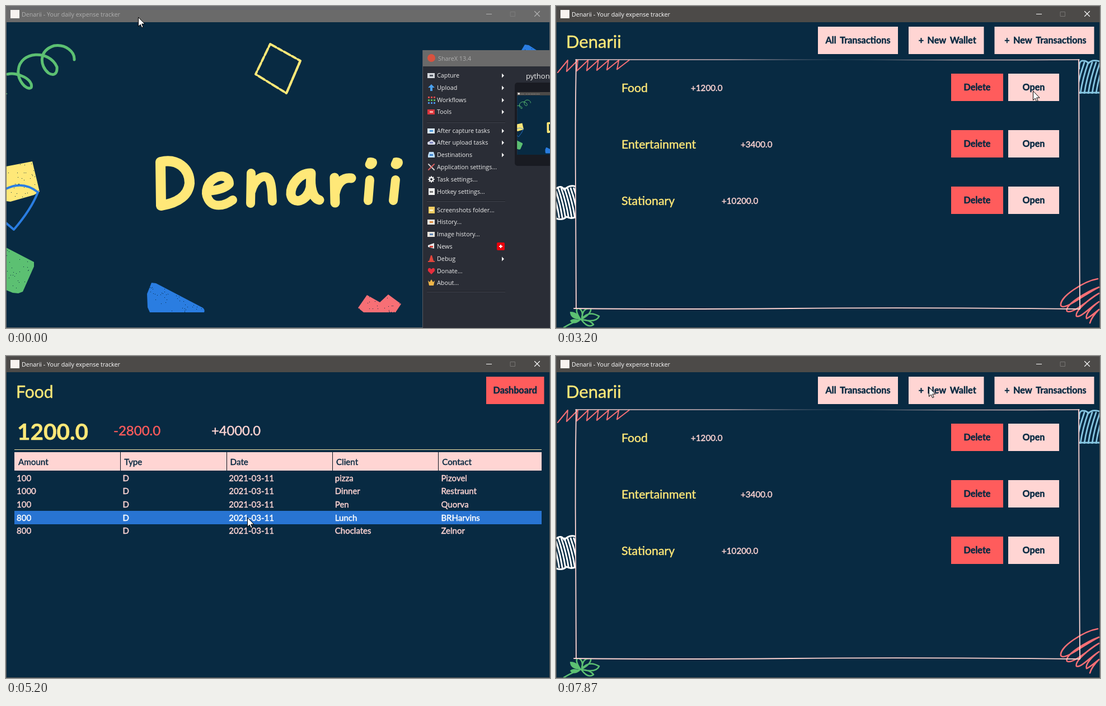
These frames come from a looping animation (972 px wide and 576 px high, 8 s). An HTML page with a canvas:

```html
<!DOCTYPE html>
<html lang="en">
<head>
<meta charset="utf-8">
<title>Denarii</title>
<style>
html, body { margin: 0; width: 100%; height: 100%; overflow: hidden; background: #082a42; }
canvas { display: block; }
</style>
</head>
<body>
<canvas id="stage" width="972" height="576"></canvas>
<script>
const ctx = document.getElementById('stage').getContext('2d');
const LOOP = 8000, FPS = 15;
const NAVY = '#082a42', YELLOW = '#ffe878', PINK = '#ffd5d3', RED = '#ff5c5c';
const BLUE = '#2a7de1', GREEN = '#5cc072', CORAL = '#f76f75', SKY = '#86c5e0';
const HAND = 'Lato, sans-serif', UI = '"Open Sans", sans-serif';

function rect(x, y, w, h, color) {
  ctx.fillStyle = color;
  ctx.fillRect(x, y, w, h);
}
function text(str, x, y, font, color, align = 'left') {
  ctx.font = font;
  ctx.fillStyle = color;
  ctx.textAlign = align;
  ctx.fillText(str, x, y);
}
// Slightly heavier, rounder text for the app's own pages.
function handText(str, x, y, size, color, align = 'left', weight = 400) {
  text(str, x, y, `${weight} ${size}px ${HAND}`, color, align);
  ctx.strokeStyle = color;
  ctx.lineWidth = .45;
  ctx.lineJoin = 'round';
  ctx.strokeText(str, x, y);
}
function fill(d, color) {
  ctx.fillStyle = color;
  ctx.fill(new Path2D(d));
}
function stroke(d, color, width, dash = []) {
  ctx.strokeStyle = color;
  ctx.lineWidth = width;
  ctx.lineCap = ctx.lineJoin = 'round';
  ctx.setLineDash(dash);
  ctx.stroke(new Path2D(d));
  ctx.setLineDash([]);
}
function clipped(x, y, w, h, draw) {
  ctx.save();
  ctx.beginPath();
  ctx.rect(x, y, w, h);
  ctx.clip();
  draw();
  ctx.restore();
}
function random(seed) {
  let s = seed * 7919 + 104729;
  return () => (s = (s * 16807) % 2147483647) / 2147483647;
}

// Filled shape with small chalk gaps inside the box x, y, w, h.
function chalk(d, color, x, y, w, h, count) {
  fill(d, color);
  const rnd = random(x * 31 + y + 7);
  ctx.save();
  ctx.clip(new Path2D(d));
  for (let i = 0; i < count; i++) {
    rect(Math.floor(x + rnd() * w), Math.floor(y + rnd() * h), 1, 1, NAVY);
  }
  ctx.restore();
}

// ---- title bar -----------------------------------------------------------
function windowButtons(color, dim) {
  rect(858, 14, 10, 1, color);
  ctx.strokeStyle = dim;
  ctx.lineWidth = 1;
  ctx.strokeRect(901.5, 10.5, 8, 8);
  stroke('M944.5 9.5L953.5 18.5M953.5 9.5L944.5 18.5', color, 1.1);
}
function windowFrame(active) {
  const edge = active ? '#5b5a59' : '#6d6d6d';
  rect(0, 0, 972, 29, active ? '#4c4a48' : '#6a6a6a');
  rect(0, 0, 972, 1, edge);
  rect(0, 0, 1, 576, edge);
  rect(971, 0, 1, 576, edge);
  rect(0, 575, 972, 1, edge);
  rect(8, 7, 16, 15, '#f7f3f0');
  text('Denarii - Your daily expense tracker', 28, 19, '10.7px ' + UI, active ? '#fff' : '#b0b0b0');
  windowButtons(active ? '#fff' : '#b4b4b4', active ? '#777573' : '#7c7c7c');
}

// ---- splash --------------------------------------------------------------
const LETTERS = [
  ['M276 279C306 272 328 290 328 317C326 337 310 352 277 357Z', 18],
  ['M361 331Q389 329 399 318C399 304 384 302 375 307C360 315 354 332 361 345C369 361 389 359 405 347', 16],
  ['M438 299L437 353M438 332C446 304 467 298 472 314C476 326 475 340 476 349', 16],
  ['M545 299C525 298 508 320 509 337C512 356 538 351 544 325L545 300C543 325 548 344 560 347', 17],
  ['M587 307L588 352M588 335C592 316 602 306 617 308', 17],
  ['M650 311L647 348M696 311L692 348', 16]
];
const DOT = 'M646 272Q654 269 661 274Q665 280 661 286Q655 294 647 291Q640 287 642 281Z';

function splash() {
  rect(0, 29, 972, 547, NAVY);
  stroke('M3 122C20 117 50 132 45 146C36 152 20 132 22 115C25 80 78 78 91 109C92 123 84 125 76 120C60 107 58 80 86 71C107 68 123 82 122 96', GREEN, 5);
  stroke('M472 68L526 98L501 156L446 122Z', YELLOW, 4, [12, 4.5, 7, 5]);
  stroke('M472 68L526 98L501 156L446 122Z', YELLOW, 3);
  stroke('M525 100L502 154', YELLOW, 4);

  chalk('M0 287L47 278L60 332L50 338L8 350L0 349Z', YELLOW, 0, 278, 60, 72, 35);
  stroke('M0 327Q30 312 57 333Q45 364 14 400L0 388', BLUE, 4);
  chalk('M0 432L50 458L50 466L30 511L22 514L12 513L0 508Z', GREEN, 0, 432, 51, 82, 30);
  chalk('M260 495L268 496L352 540Q356 544 354 548H257L253 539L252 515Z', BLUE, 252, 495, 102, 53, 60);
  chalk('M629 540L645 517L668 530L683 516L706 533L696 548H639Z', CORAL, 629, 516, 77, 32, 30);
  chalk('M927 69L934 70L971 94V104L944 157L934 156L915 145L928 110L909 99Z', BLUE, 909, 69, 62, 88, 45);
  chalk('M922 341L964 304L971 315V379L966 384Z', CORAL, 922, 304, 49, 80, 30);
  stroke('M973 288C955 262 942 258 939 269C938 301 953 338 973 341', YELLOW, 4);
  stroke('M909 441C929 445 950 438 959 423Q965 419 973 422M973 433Q954 442 951 433Q955 424 973 428', GREEN, 3);
  rect(0, 156, 2, 2, GREEN);

  for (const [d, width] of LETTERS) stroke(d, YELLOW, width);
  fill(DOT, YELLOW);
  ctx.save();
  ctx.translate(46, 0);
  fill(DOT, YELLOW);
  ctx.restore();
}

// ---- capture tool window -------------------------------------------------
// label, text centre y, trailing arrow, icon colour, icon accent
const MENU = [
  ['Capture', 124, 1, '#d4d7dc', '#555b66'],
  ['Upload', 146, 1, '#4aa0ee', 0],
  ['Workflows', 168, 1, '#4a90e2', 0],
  ['Tools', 189, 1, '#d9363e', '#ffb0a8'],
  ['After capture tasks', 223, 1, '#d8e6f0', '#4d9be0'],
  ['After upload tasks', 244, 1, '#d9dcea', '#7f86c0'],
  ['Destinations', 266, 1, '#bcdcf5', '#3b82cf'],
  ['Application settings...', 288, 0, '#d5d5d5', 0],
  ['Task settings...', 310, 0, '#eeeeee', 0],
  ['Hotkey settings...', 332, 0, '#f0f0f0', '#777'],
  ['Screenshots folder...', 365, 0, '#f2cc62', '#fff3c6'],
  ['History...', 386, 0, '#e8e4dc', '#e08b3c'],
  ['Image history...', 408, 0, '#e8e4dc', '#5d83b5'],
  ['News', 430, 0, '#e8e8e8', '#d9453d'],
  ['Debug', 452, 1, '#e0463c', 0],
  ['Donate...', 474, 0, '#e62d3c', 0],
  ['About...', 495, 0, '#f0b648', 0]
];
const ICONS = {
  Upload: 'M0-6L6 0H2V6H-2V0H-6Z',
  'After upload tasks': 'M-6 4Q-9-1-3-2Q0-7 4-2Q9 0 6 4Z',
  Destinations: 'M-4-5H4L6 1V5H-6V1Z',
  News: 'M-6-2L5-6V4L-6 1Z',
  Debug: 'M-1-6H1L4 4H6V6H-6V4H-4Z',
  'Donate...': 'M0 6L-6 0Q-7-6-2-5L0-3L2-5Q7-6 6 0Z',
  'About...': 'M-6-4L-3-1L0-6L3-1L6-4L4 5H-4Z'
};
function menuIcon(label, y, color, accent) {
  ctx.save();
  ctx.translate(760, y);
  if (label === 'Workflows') {
    ['#e14b4b', '#59b75c', '#4a90e2'].forEach((c, row) => {
      for (let i = 0; i < 3; i++) rect(-6 + i * 5, -6 + row * 5, 3, 3, c);
    });
  } else if (label.startsWith('Application')) {
    stroke('M-5-5L5 5', color, 2);
    stroke('M5-5L-5 5', '#d96060', 2);
  } else if (label.startsWith('Task')) {
    ctx.beginPath();
    ctx.arc(0, 0, 3.2, 0, 7);
    ctx.strokeStyle = color;
    ctx.lineWidth = 2.4;
    ctx.stroke();
    stroke('M0-5V-4M0 4V5M-5 0H-4M4 0H5M-3.5-3.5L-3-3M3.5 3.5L3 3M3.5-3.5L3-3M-3.5 3.5L-3 3', color, 2);
  } else if (ICONS[label]) {
    fill(ICONS[label], color);
  } else if (label.startsWith('Hotkey') || label.startsWith('Screenshots')) {
    rect(-5, -6, 11, 12, color);
  } else {
    rect(-7, -4, 13, 9, color);
  }
  if (accent) rect(-3, -1, 6, 3, accent);
  ctx.restore();
}
function captureWindow() {
  rect(744, 79, 228, 497, '#2a2d36');
  rect(744, 79, 228, 29, '#6a6a6a');
  rect(744, 79, 1, 497, '#555861');
  ctx.beginPath();
  ctx.arc(760, 93, 7, 0, 7);
  ctx.fillStyle = '#d8523f';
  ctx.fill();
  text('ShareX 13.4', 772, 97.5, '10.8px ' + UI, '#adadad');

  for (const [label, y, arrow, color, accent] of MENU) {
    menuIcon(label, y, color, accent);
    text(label, 770, y + 4, '10.8px ' + UI, '#ededed');
    if (arrow) fill(`M886 ${y - 3.5}L890 ${y + .5}L886 ${y + 4.5}Z`, '#f0f0f0');
  }
  for (const y of [207, 348, 510]) {
    rect(752, y, 140, 1, '#1d1f25');
    rect(752, y + 1, 140, 1, '#41444e');
  }
  ctx.beginPath();
  ctx.roundRect(877, 423, 14, 14, 2);
  ctx.fillStyle = '#e8000c';
  ctx.fill();
  rect(881, 429, 6, 2, '#fff');
  rect(883, 427, 2, 6, '#fff');

  text('python_', 929, 130, '13px ' + UI, '#f0f0f0');
  ctx.beginPath();
  ctx.roundRect(909, 137, 70, 149, 5);
  ctx.fillStyle = '#191b22';
  ctx.fill();
  clipped(913, 154, 59, 112, () => {
    ctx.translate(913, 154);
    ctx.scale(.2, .2);
    splash();
    windowFrame(true);
  });
}

// ---- wallet list ---------------------------------------------------------
function button(label, x, y, w, color, pressed) {
  const shift = pressed ? 1 : 0;
  rect(x, y, w, 49, pressed ? '#f0f0f0' : color);
  ctx.wordSpacing = '2.5px';
  handText(label, x + w / 2 + shift, y + 30 + shift, 16.2, pressed ? '#000' : NAVY, 'center', 700);
  ctx.wordSpacing = '0px';
}
function stripes(x0, x1, gap, top, bottom, lean, color, width) {
  for (let x = x0; x < x1; x += gap) {
    stroke(`M${x} ${bottom}Q${x + lean * .3} ${(top + bottom) / 2} ${x + lean} ${top}`, color, width);
  }
}
function doodles() {
  clipped(0, 96, 140, 30, () => {
    let d = 'M3 119L21 97';
    for (let i = 0; i < 6; i++) d += `Q${20 + i * 18} 108 ${19 + i * 18} ${117 - i * .7}L${39 + i * 18.3} 97`;
    stroke(d, CORAL, 2);
  });
  clipped(934, 96, 37, 61, () => {
    stripes(930, 975, 7, 101, 156, 14, SKY, 2.8);
    stroke('M935 112Q934 97 942 98Q949 98 951 103Q957 95 971 99M935 155H972', SKY, 2.8);
  });
  clipped(1, 320, 34, 63, () => {
    stripes(0, 52, 5.6, 326, 378, -13, '#fff', 2.9);
    stroke('M0 327Q9 319 15 329Q23 319 36 323M0 380Q11 384 19 377Q27 382 36 377', '#fff', 3);
  });
  clipped(0, 541, 90, 34, () => {
    fill('M43 561Q25 560 25 547Q39 546 43 561M43 563Q31 572 25 563Q31 557 43 563', GREEN);
    stroke('M14 575Q31 565 46 560M44 561Q32 543 40 540Q50 545 46 560Q47 539 62 541Q64 550 46 560Q58 544 77 555Q72 567 46 561Q62 562 67 570Q57 577 46 562', GREEN, 2.6);
  });
  stroke('M968 488C944 492 899 520 902 536C908 546 947 514 970 503C948 511 908 535 913 546C923 552 952 525 970 514C954 523 926 546 930 555C938 558 955 538 970 529C958 538 945 551 948 559Q952 558 970 543Q957 556 954 567', CORAL, 2.6);
}
function wallets(openPressed) {
  rect(0, 29, 972, 547, NAVY);
  doodles();
  stroke('M36 96Q34 210 35 330L36 541M934 96Q935 230 935 360L936 542M32 541Q200 543 420 541T936 542', PINK, 1.8);
  const fade = ctx.createLinearGradient(35, 0, 935, 0);
  fade.addColorStop(0, PINK);
  fade.addColorStop(.3, '#bfa9b0');
  fade.addColorStop(.52, '#24405680');
  fade.addColorStop(.75, '#a8989f');
  fade.addColorStop(1, PINK);
  stroke('M35 96Q300 95 520 96T935 96', fade, 1.3);

  handText('Denarii', 18, 75, 31, YELLOW);
  button('All Transactions', 468, 37, 143, PINK);
  button(' + New Wallet', 630, 37, 134.5, PINK);
  button(' + New Transactions', 783.5, 37, 178, PINK);
  [['Food', '+1200.0', 241], ['Entertainment', '+3400.0', 330], ['Stationary', '+10200.0', 296]]
    .forEach(([name, sum, x], i) => {
      const y = 121 + i * 101;
      handText(name, 117, y + 32.5, 21.2, YELLOW);
      handText(sum, x, y + 30.5, 15.2, PINK);
      button('Delete', 706, y, 93, RED);
      button('Open', 808, y, 91, PINK, openPressed && i === 0);
    });
}

// ---- wallet page ---------------------------------------------------------
const HEADERS = ['Amount', 'Type', 'Date', 'Client', 'Contact'];
const ROWS = [
  ['100', 'pizza', 'Pizovel'],
  ['1000', 'Dinner', 'Restraunt'],
  ['100', 'Pen', 'Quorva'],
  ['800', 'Lunch', 'BRHarvins'],
  ['800', 'Choclates', 'Zelnor']
];
function walletPage(selected, pressed) {
  rect(0, 29, 972, 547, NAVY);
  handText('Food', 18, 75, 30, YELLOW);
  button('Dashboard', 858, 37, 103.5, RED, pressed);
  handText('1200.0', 20, 150, 40.5, YELLOW, 'left', 700);
  handText('-2800.0', 192, 142, 24, RED);
  handText('+4000.0', 367, 142, 23.7, PINK);
  rect(15, 167, 942, 1, '#f4e6a8');
  rect(15, 172, 942, 33, PINK);
  HEADERS.forEach((name, i) => {
    const x = 15 + i * 189.3;
    if (i) rect(Math.round(x), 172, 1, 33, '#06131e');
    handText(name, x + 7, 195, 15.2, NAVY);
  });
  ROWS.forEach(([amount, client, contact], row) => {
    const y = 206 + row * 23.7, on = row === selected;
    if (on) rect(15, Math.round(y), 942, 24, '#2874d2');
    [amount, 'D', '2021-03-11', client, contact].forEach((cell, i) =>
      handText(cell, 19 + i * 189.6, y + 17.5, 15, on ? '#fff' : PINK));
  });
}

// ---- pointer -------------------------------------------------------------
// step, x, y
const PATH = [
  [0, 236, 20], [15, 236, 20], [19, 319, 100], [22, 301, 138], [30, 301, 138],
  [33, 624, 84], [34, 650, 82], [38, 690, 362], [41, 703, 316], [42, 703, 316],
  [48, 852, 152], [57, 852, 152], [65, 432, 262], [70, 432, 262], [75, 431, 289],
  [79, 431, 289], [90, 930, 56], [91, 930, 56], [103, 860, 87], [107, 856, 72],
  [112, 856, 72], [118, 666, 56], [120, 666, 56]
];
function slope(i, axis) {
  const a = PATH[i], b = PATH[i + 1];
  return a && b ? (b[axis] - a[axis]) / (b[0] - a[0]) : 0;
}
// Monotone tangent: zero at rests and turning points.
function tangent(i, axis) {
  const p = slope(i - 1, axis), q = slope(i, axis);
  return p * q > 0 ? 2 * p * q / (p + q) : 0;
}
function pointerAt(step) {
  const i = PATH.findIndex((p, k) => k + 1 < PATH.length && step < PATH[k + 1][0]);
  const a = PATH[i], b = PATH[i + 1], span = b[0] - a[0], u = (step - a[0]) / span;
  return [1, 2].map(axis => Math.round(
    a[axis] * (1 + 2 * u) * (1 - u) ** 2 + b[axis] * u * u * (3 - 2 * u) +
    span * (tangent(i, axis) * u * (1 - u) ** 2 - tangent(i + 1, axis) * u * u * (1 - u))));
}
function pointer(x, y) {
  ctx.save();
  ctx.translate(x + .5, y + .5);
  const d = 'M0 0V16L3.7 12.6L6.2 18.2L8.6 17.1L6.2 11.6H11.2Z';
  fill(d, '#fff');
  ctx.lineJoin = 'miter';
  ctx.strokeStyle = '#000';
  ctx.lineWidth = 1;
  ctx.stroke(new Path2D(d));
  ctx.restore();
}

// ---- timeline ------------------------------------------------------------
function draw(ms) {
  const step = Math.floor((ms + 5) * FPS / 1000) % 120;
  if (step < 26) splash();
  else if (step < 57 || step >= 91) wallets(step === 56);
  else walletPage(step < 71 ? -1 : step < 78 ? 2 : 3, step === 90);
  windowFrame(step >= 9);
  if (step < 9) captureWindow();
  pointer(...pointerAt(step));
}
function tick(now) {
  draw(now % LOOP);
  requestAnimationFrame(tick);
}
draw(0);
requestAnimationFrame(tick);
</script>
</body>
</html>
```
